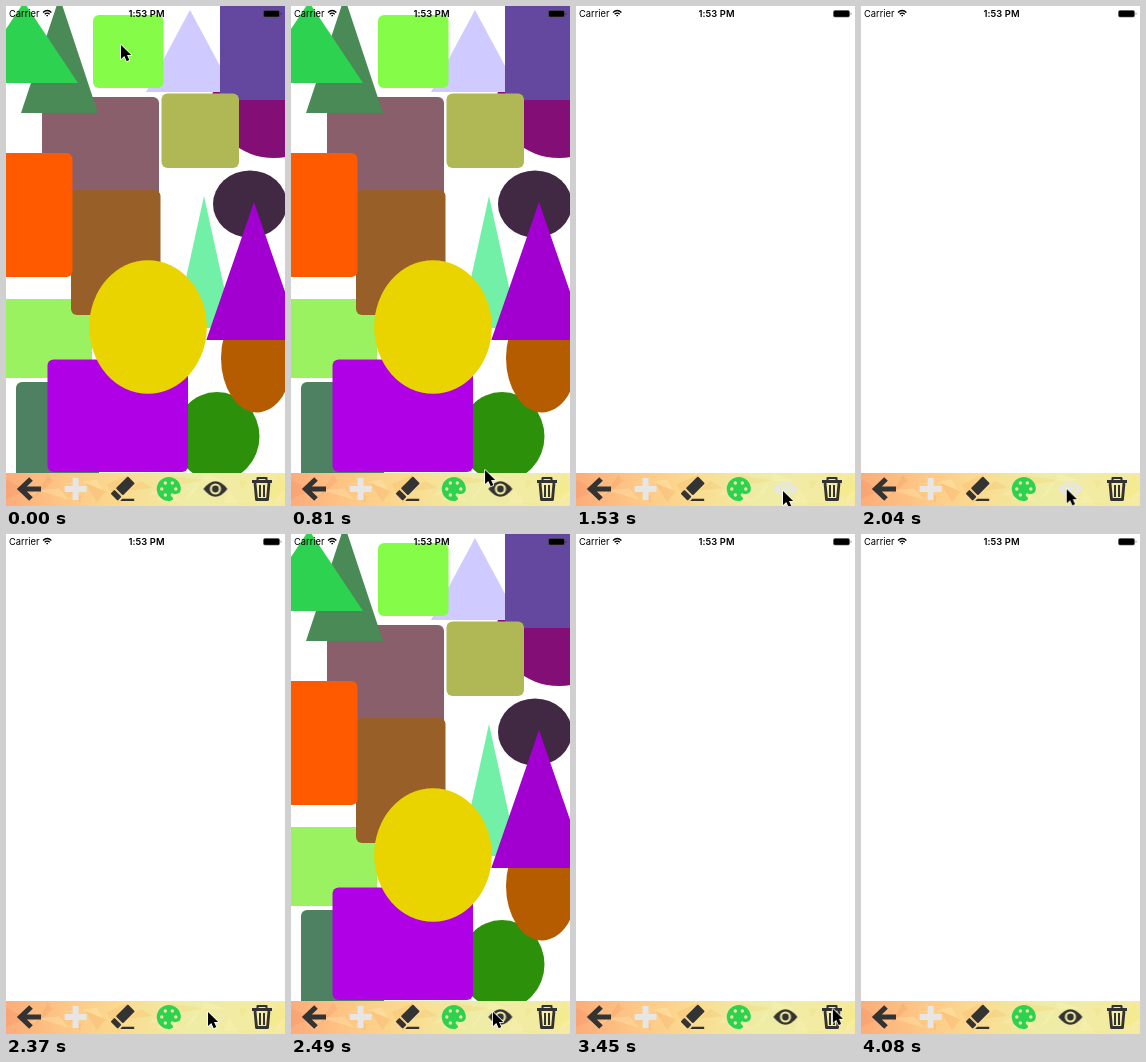
An HTML page that plays this animation: 279x500 px, repeating every 5.04 s.

```html
<!DOCTYPE html>
<html lang="en">
<head>
<meta charset="utf-8">
<title>Shape board</title>
<style>
  html, body { margin: 0; width: 100%; height: 100%; overflow: hidden; background: #fff; }
  svg { display: block; width: 100vw; height: 100vh; }
  text { font: 9.3px Inter, Roboto, sans-serif; }
  .time { font-weight: 600; letter-spacing: .1px; }
  .line { fill: none; stroke: #333; }
</style>
</head>
<body>
<svg viewBox="0 0 279 500">
  <defs>
    <linearGradient id="warm">
      <stop offset="0" stop-color="#fcac7a"/>
      <stop offset=".22" stop-color="#fdc886"/>
      <stop offset=".42" stop-color="#fbdb90"/>
      <stop offset=".65" stop-color="#eeeca6"/>
      <stop offset="1" stop-color="#f5eaa0"/>
    </linearGradient>
  </defs>

  <g id="shapes"></g>

  <g id="status">
    <text x="3" y="11">Carrier</text>
    <text class="time" x="140.5" y="11" text-anchor="middle">1:53 PM</text>
    <path d="M37 6.4Q41.2 2.6 45.4 6.4M38.7 8.3Q41.2 6 43.7 8.3M40.4 9.6h1.6" fill="none" stroke="#000" stroke-width="1.3"/>
    <rect x="257.5" y="4.5" width="16" height="6.500" rx="1.500" stroke="#555" stroke-width=".6"/>
    <path d="M274.800 6.300q1.200 1.500 0 3z"/>
  </g>

  <rect y="467" width="279" height="33" fill="url(#warm)"/>
  <g id="facets"></g>

  <!-- Each icon is drawn around its own centre -->
  <g id="icons">
    <path class="line" d="M12 0H-8M2-10L-8.400 0L2 10" stroke-width="5.200"/>
    <path class="line" d="M-11 0H11M0-11V11" stroke-width="6" stroke-linejoin="round" style="stroke:#e6e6e6"/>
    <g fill="#333">
      <g transform="rotate(-45)">
        <rect x="-4" y="-5" width="17" height="10" rx="1"/>
        <rect x="-11.500" y="-5" width="5.500" height="10" rx="1"/>
      </g>
      <path d="M0 9.800H12V12H-2z"/>
    </g>
    <g>
      <path d="M0-12A12 12 0 0 1 12 0C12 4 9 5 6 5S3 8 4 9S3 12 0 12A12 12 0 0 1 0-12z" fill="#2dd250"/>
      <g id="wells" fill="#f3e8a4"></g>
    </g>
    <path id="eye" fill-rule="evenodd" d="M-12 0Q-6-7.700 0-7.700T12 0Q6 7.700 0 7.700T-12 0zM-5.600 0a5.600 5.600 0 1 0 11.200 0a5.600 5.600 0 1 0-11.200 0zM-3.400 0a3.400 3.400 0 1 0 6.800 0a3.400 3.400 0 1 0-6.800 0z"/>
    <g id="bin" class="line" stroke-linejoin="round">
      <path d="M-10-7.500H10M-7-6L-5.500 10.500H5.500L7-6" stroke-width="2.800"/>
      <path d="M-4.500-8V-11H4.500V-8M-2-4V8M2-4V8" stroke-width="2"/>
    </g>
  </g>

  <path id="cursor" d="M0 0V14L3.300 11L5.700 16.200L8.300 15L6 10H10.200z" stroke="#fff" stroke-width="1.600" paint-order="stroke" stroke-linejoin="round"/>
</svg>
<script>
const LOOP = 5040;
const $ = id => document.getElementById(id);

function add(parent, tag, attrs) {
  const node = document.createElementNS($('icons').namespaceURI, tag);
  for (const key in attrs) node.setAttribute(key, attrs[key]);
  $(parent).append(node);
}

const box = (fill, x1, y1, x2, y2) =>
  add('shapes', 'rect', { fill, x: x1, y: y1, width: x2 - x1, height: y2 - y1, rx: 6 });
const oval = (fill, cx, cy, rx, ry) => add('shapes', 'ellipse', { fill, cx, cy, rx, ry });
const peak = (fill, x, top, half, base) =>
  add('shapes', 'path', { fill, d: `M${x} ${top}L${x + half} ${base}H${x - half}z` });

// Back to front
box('#885f6b', 36, 91, 153, 215);
peak('#4a8a56', 53.5, -9, 38.5, 107);
peak('#2dd250', 18, -4, 54, 77);
oval('#820e76', 268, 95, 62, 57);
peak('#cfcaff', 184, 4, 44, 86);
box('#84fc48', 87, 9, 157.5, 82);
box('#6448a0', 214, -10, 290, 94);
box('#b0b855', 155.5, 87.5, 233, 162);
box('#9af260', -10, 293, 86, 372);
box('#986028', 65, 184, 154.5, 309);
box('#ff5a00', -10, 147, 66.5, 271);
oval('#412843', 244, 198, 37, 33.5);
peak('#72f0a8', 198, 190, 29, 322);
oval('#2c900a', 211, 430.5, 42.5, 44.5);
oval('#b65c00', 251, 352, 36, 54.5);
peak('#a200d0', 248, 196, 47.7, 334);
box('#4e8062', 10, 376, 93, 490);
box('#b000e6', 41.5, 353.5, 182, 466);
oval('#ead400', 142, 321, 58.8, 66.8);

// Soft low-poly texture from seeded triangles
let seed = 7;
const random = () => (seed = seed * 16807 % 2147483647) / 2147483647;
for (let i = 0; i < 24; i++) {
  const x = i * 12 - 10;
  const corner = () => `${x + random() * 40} ${467 + random() * 33}`;
  add('facets', 'path', {
    fill: i % 2 ? '#fff6c0' : `hsl(${18 + i * 1.8} 85% 66%)`,
    opacity: .25,
    d: `M${corner()}L${corner()}L${corner()}z`
  });
}

[...$('icons').children].forEach((icon, i) =>
  icon.setAttribute('transform', `translate(${23 + i * 46.6} 483)`));

for (let i = 0; i < 6; i++) {
  const angle = i * Math.PI / 3;
  add('wells', 'circle', { cx: 7 * Math.cos(angle), cy: 7 * Math.sin(angle), r: 1.7 });
}

const play = (id, frames) => $(id).animate(frames, { duration: LOOP, iterations: Infinity });

// Steps of [ms, value], each held until the next
function hold(id, prop, ...steps) {
  const frames = steps.map(([ms, value]) => ({ offset: ms / LOOP, [prop]: value, easing: 'step-end' }));
  play(id, [...frames, { offset: 1, [prop]: steps.at(-1)[1] }]);
}

hold('shapes', 'opacity', [0, 1], [1530, 0], [2490, 1], [3450, 0]);
hold('eye', 'opacity', [0, 1], [1440, .2], [1530, 1], [2370, .1], [2490, 1]);
hold('eye', 'fill', [0, '#333'], [1530, '#e6e6e6'], [2490, '#333']);
hold('bin', 'opacity', [0, 1], [3330, .2], [3450, 1]);
hold('cursor', 'opacity', [0, 1], [4080, 0]);

// The pointer rests between moves
const path = [];
let spot = 'translate(115px, 39px)';
const rest = ms => path.push({ offset: ms / LOOP, transform: spot });
function move(start, end, x, y) {
  rest(start);
  spot = `translate(${x}px, ${y}px)`;
  rest(end);
}

rest(0);
move(390, 600, 172, 461);
move(720, 810, 194, 464);
move(810, 1260, 207, 485);
move(1950, 2310, 202, 478);
move(2820, 3150, 257, 475);
move(3420, 3870, 255, 473);
rest(LOOP);
play('cursor', path);
</script>
</body>
</html>
```
